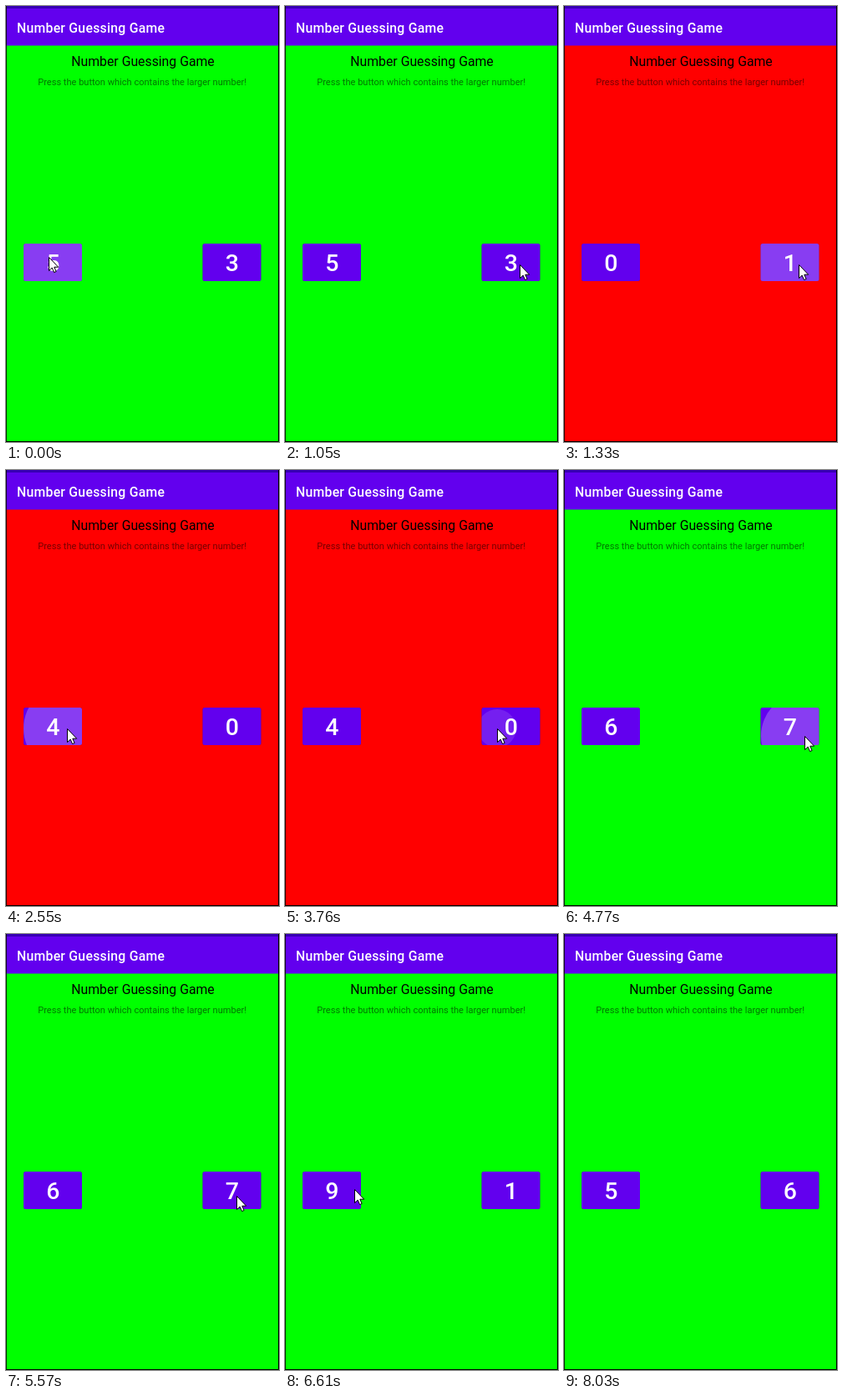
An HTML page that plays this animation: 327x523 px, repeating every 8.74 s.

```html
<!DOCTYPE html>
<html lang="en">
<head>
<meta charset="utf-8">
<title>Number Guessing Game</title>
<style>
  html, body { margin: 0; width: 100%; height: 100%; overflow: hidden; }
  svg { display: block; width: 327px; height: 523px; font-family: Roboto, sans-serif; }
  .digit { font-size: 28.5px; font-weight: 500; fill: #fff; text-anchor: middle; }
  .face { fill: #6200ee; filter: drop-shadow(0 .5px .5px rgba(0, 0, 0, .3)); }
</style>
</head>
<body>
<svg viewBox="0 0 327 523">
  <defs>
    <rect id="button" y="285" width="70" height="45" rx="2.5"/>
    <clipPath id="clip0"><use href="#button" x="21"/></clipPath>
    <clipPath id="clip1"><use href="#button" x="235.5"/></clipPath>
  </defs>
  <rect id="bg" width="327" height="523"/>
  <rect width="327" height="47.5" fill="#6200ee"/>
  <rect width="327" height="3" fill="#3700b3"/>
  <text x="13" y="32" font-size="15.8" font-weight="500" letter-spacing=".25" fill="#fff">Number Guessing Game</text>
  <text x="164" y="72" font-size="15.8" text-anchor="middle">Number Guessing Game</text>
  <text x="163.2" y="95" font-size="11.06" text-anchor="middle" fill-opacity=".54">Press the button which contains the larger number!</text>
  <use class="face" href="#button" x="21"/>
  <use class="face" href="#button" x="235.5"/>
  <circle id="ripple" fill="#fff"/>
  <text id="left" class="digit" x="56.3" y="317.8"></text>
  <text id="right" class="digit" x="270.8" y="317.8"></text>
  <path d="M.5 0V523" stroke="#000" stroke-opacity=".8"/>
  <path d="M326.5 0V522.5H0" fill="none" stroke="#000"/>
  <path id="cursor" d="M.5 .5V16.6L4.2 13.1L6.6 18.6L9.1 17.5L6.8 12.2H11.7Z" fill="#fff" stroke="#000"/>
</svg>
<script>
const LOOP = 8740, STEP = 120;
const $ = id => document.getElementById(id);

// Each press: [time, new left number, new right number, first ripple radius]
const rounds = [
  [0, 5, 3, 99], [1330, 0, 1, 99], [2550, 4, 0, 52], [3760, 2, 8, 23],
  [4630, 6, 7, 23], [5870, 9, 1, 99], [6890, 5, 6, 99]
];

// Pointer glides: [time, steps, x, y]
const glides = [
  [0, 1, 51, 301], [270, 2, 161, 317], [540, 1, 181, 322], [660, 2, 93, 319],
  [920, 2, 281, 310], [1870, 2, 73, 310], [3220, 4, 254, 310], [4260, 1, 153, 309],
  [4380, 1, 288, 319], [5170, 4, 276, 314], [6130, 5, 83, 306],
  [7400, 2, 204, 404], [7670, 4, 291, 530]
];

const stepsSince = (time, t) => Math.floor((t - time) / STEP);
const easeOut = p => 1 - (1 - p) ** 3;

function pointer(t) {
  const i = glides.findLastIndex(([time]) => time <= t);
  const [time, steps, x, y] = glides[i];
  const [, , x0, y0] = glides[Math.max(0, i - 1)];
  const k = easeOut(Math.min(1, (stepsSince(time, t) + 1) / steps));
  return [x0 + (x - x0) * k, y0 + (y - y0) * k];
}

const isRight = x => x > 163;
const clickTime = ([time, , , radius]) => time + (radius < 50 ? STEP : 0);

function isCorrect(i) {
  if (i === 0) return true;
  const [, left, right] = rounds[i - 1];
  return isRight(pointer(rounds[i][0])[0]) === right > left;
}

function draw(t) {
  const shown = rounds.findLastIndex(round => clickTime(round) <= t);
  const [, left, right] = rounds[shown];
  $('bg').setAttribute('fill', isCorrect(shown) ? '#0f0' : '#f00');
  $('left').textContent = left;
  $('right').textContent = right;

  const [x, y] = pointer(t).map(Math.round);
  $('cursor').setAttribute('transform', `translate(${x} ${y})`);

  // The ripple grows from the touch, peaks at the click and fades
  const press = rounds.findLast(([time]) => time <= t);
  const age = stepsSince(clickTime(press), t);
  const set = (name, value) => $('ripple').setAttribute(name, value);
  set('cx', x);
  set('cy', y);
  set('r', press[3] * 2.26 ** Math.min(3, stepsSince(press[0], t)));
  set('opacity', age > 1 ? 0 : .24 / (1 + Math.abs(age)));
  set('clip-path', `url(#clip${+isRight(x)})`);
}

const start = performance.now();
function tick() {
  draw((performance.now() - start) % LOOP);
  requestAnimationFrame(tick);
}
tick();
</script>
</body>
</html>
```
